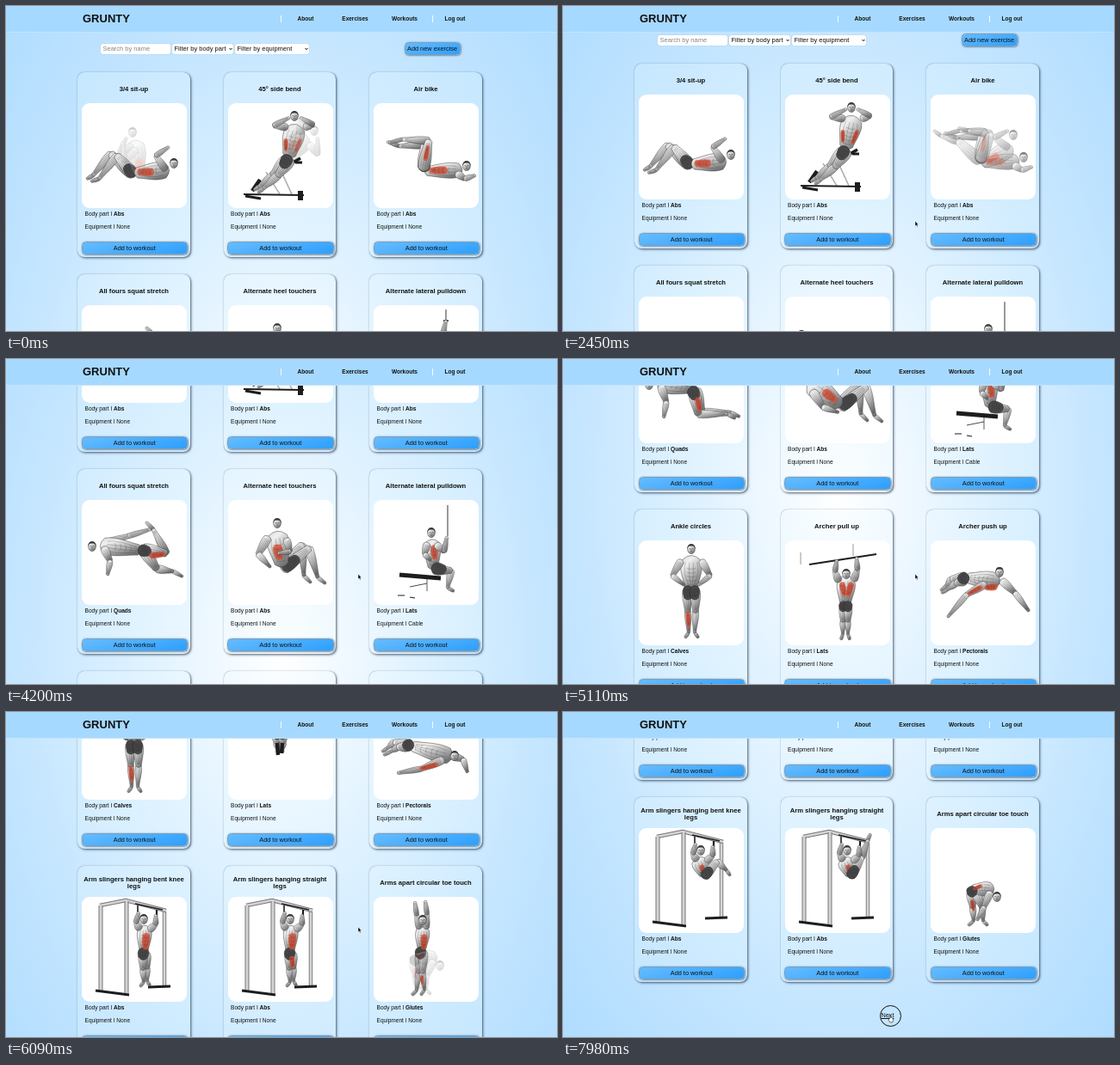
These frames come from a looping animation (640x378 px, 8000 ms). An HTML page:

```html
<!DOCTYPE html>
<html lang="en">
<head>
<meta charset="utf-8">
<title>Exercises</title>
<style>
html, body { margin: 0; width: 100%; height: 100%; overflow: hidden; }
body { position: relative; font: 6.57px "Liberation Sans", Arial, sans-serif; color: #111; background: #b5dfff; }
body *, #page { position: absolute; box-sizing: border-box; white-space: nowrap; }
svg *, b { position: static; }
#page { left: 0; top: 0; width: 640px; height: 1061px; background: radial-gradient(#fff, #dbf0ff 40%, #c3e5ff 70%, #afdcff); }
header { left: 0; top: 0; width: 640px; height: 30.5px; background: #a6d9ff; border-bottom: 1px solid #c2e4fb; }
header h1 { left: 89px; top: 7px; margin: 0; font-size: 13px; line-height: 15px; }
header span { top: 10px; line-height: 9px; font-size: 6.53px; font-weight: bold; transform: translateX(-50%); }
header i { top: 11px; width: 1px; height: 7.5px; background: #f4fbff; }
.field { top: 43.5px; height: 12.5px; padding-left: 2.5px; line-height: 12.5px; font-size: 7.5px; background: #fff; border-radius: 2px; box-shadow: 0 0 .8px #789; }
.field svg { right: 1.5px; top: 4.5px; width: 4px; height: 4px; }
.button { height: 15px; line-height: 13px; font-size: 7.35px; text-align: center; border-radius: 4.5px;
  border: 1px solid #7c9fba; background: linear-gradient(165deg, #66bcff, #2d9fff); box-shadow: .5px .5px 2px rgba(20, 50, 80, .7); }
.card { width: 130.5px; height: 215px; border-radius: 8px; background: rgba(235, 247, 255, .2);
  box-shadow: 0 0 .8px rgba(60, 95, 130, .8), 1.2px 1.2px 2.6px rgba(15, 35, 60, .65); }
.card p { margin: 0; left: 8.5px; line-height: 10px; }
.title { left: 5px; top: 10px; width: 121px; height: 20px; display: flex; align-items: center; justify-content: center;
  white-space: normal; text-align: center; font-weight: bold; font-size: 7.65px; line-height: 8.5px; }
.figure { left: 5px; top: 36px; width: 122px; height: 122px; border-radius: 9px; background: #fff; overflow: hidden; }
#next { left: 369.5px; top: 1031px; line-height: 10px; font-size: 7.3px; }
#ring { left: 367.5px; top: 1023.5px; width: 25px; height: 25px; border: 1.3px solid #111; border-radius: 50%; }
#arrow, #hand { left: 0; top: 0; overflow: visible; }
</style>
</head>
<body>
<svg width="0" height="0"><defs><linearGradient id="skin" x2=".6" y2="1">
  <stop stop-color="#d8d8d8"/><stop offset=".3" stop-color="#f0f0f0"/><stop offset=".6" stop-color="#bcbcbc"/><stop offset="1" stop-color="#747474"/>
</linearGradient></defs></svg>
<div id="page">
  <div class="field" style="left:110px;width:81px;color:#858585">Search by name</div>
  <div class="field" style="left:193px;width:71px">Filter by body part<svg viewBox="0 0 4 4"><path d="M.5 1 2 2.7 3.5 1" fill="none" stroke="#111"/></svg></div>
  <div class="field" style="left:266px;width:86px">Filter by equipment<svg viewBox="0 0 4 4"><path d="M.5 1 2 2.7 3.5 1" fill="none" stroke="#111"/></svg></div>
  <div class="button" style="left:462.5px;top:42px;width:65px">Add new exercise</div>
  <div id="next">Next</div><div id="ring"></div>
</div>
<header>
  <h1>GRUNTY</h1><i style="left:319px"></i>
  <span style="left:348px">About</span><span style="left:405.5px">Exercises</span><span style="left:463px">Workouts</span>
  <i style="left:495px"></i><span style="left:521.5px">Log out</span>
</header>
<svg id="arrow" width="6" height="9"><path d="M0 0V6L1.3 4.9 2.2 7 3.2 6.5 2.3 4.6H4Z" fill="#000" stroke="#fff" stroke-width=".5"/></svg>
<svg id="hand" width="7" height="10"><path d="M1.2 5V.8Q1.8 0 2.4.8V3.4L5.4 4.2V7L4.6 9H1.8L0 6Q.2 4.8 1.2 5Z" fill="#fff" stroke="#111" stroke-width=".6"/></svg>
<script>
const PERIOD = 2000, FADE = 100, LOOP = 8000, STEP = 70;

// A tapered, bulging muscle between two joints, with fibres along it and ribs across it.
function muscle([x1, y1, x2, y2], r1, r2, { fill = 'url(#skin)', ink = '#3c3c3c', edge = ink, ribs = [] } = {}) {
  const dx = x2 - x1, dy = y2 - y1, len = Math.hypot(dx, dy) || 1;
  const at = (k, side) => `${(x1 + dx * k - dy / len * side).toFixed(1)},${(y1 + dy * k + dx / len * side).toFixed(1)}`;
  const outline = `M${at(0, r1)}C${at(.35, r1 * 1.35)} ${at(.65, r2 * 1.25)} ${at(1, r2)}Q${at(1 + r2 / len, 0)} ${at(1, -r2)}` +
    `C${at(.65, -r2 * 1.25)} ${at(.35, -r1 * 1.35)} ${at(0, -r1)}Q${at(-r1 / len, 0)} ${at(0, r1)}Z`;
  const fibres = [-.6, -.2, .2, .6].map(s => `M${at(.08, r1 * s)}Q${at(.45, r1 * s * 1.6)} ${at(.92, r2 * s * .7)}`).join('') +
    ribs.map(k => `M${at(k, -r2 * .7)}Q${at(k + .08, 0)} ${at(k, r2 * .7)}`).join('');
  return `<path d="${outline}" fill="${fill}" stroke="${edge}" stroke-width=".5"/>` +
    `<path d="${fibres}" fill="none" stroke="${ink}" stroke-width=".45" opacity=".6"/>`;
}

const line = (n, color) =>
  `<polyline points="${n.slice(0, -1)}" fill="none" stroke="${color}" stroke-width="${n.at(-1)}" stroke-linejoin="round"/>`;

const parts = {
  A: n => muscle(n, 3.8 * (n[6] || 1), 2.6 * (n[6] || 1)) + muscle(n.slice(2), 2.8 * (n[6] || 1), 1.6),
  L: ([...n]) => {
    const k = n[8] || 1;
    return muscle(n.slice(4), 2 * k, 1.5) + muscle(n.slice(2), 4.3 * k, 2 * k) + muscle(n, 6.2 * k, 4 * k);
  },
  T: n => muscle(n, n[4] || 9, (n[4] || 9) * .68, { ribs: [.3, .45, .6, .75, .9] }),
  S: n => muscle(n, n[4] || 5.8, (n[4] || 5.8) * .88, { fill: '#48484a', ink: '#1c1c1c' }),
  R: n => muscle(n, n[4] || 2.8, (n[4] || 2.8) * .8, { fill: 'rgba(214,78,52,.78)', ink: '#7d2416', edge: 'none', ribs: [.2, .45, .7] }),
  H: ([x, y]) => `<g transform="translate(${x} ${y})"><ellipse rx="4.4" ry="5.6" fill="url(#skin)" stroke="#3c3c3c" stroke-width=".5"/>` +
    '<path d="M-4.5.5Q-5-6 0-6T4.5.5Q4-2.5 2.6-3.2T-2.6-3.2Q-4-2.5-4.5.5Z" fill="#3a3a3a"/>' +
    '<path d="M-2.4-.4H-.8M.8-.4H2.4M0 0V1.6M-1.2 3H1.2" stroke="#444" stroke-width=".6"/></g>',
  K: n => line(n, '#1d1d1f'),
  G: n => line(n, '#77777a') + line([...n.slice(0, -1), n.at(-1) * .6], '#d4d4d6')
};

const draw = pose => pose.split(';').filter(Boolean).map(part =>
  parts[part[0]](part.match(/[\d.]+/g).map(Number))).join('');

// Shared equipment and half figures
const bench = 'G 60,106 44,80 1.3;G 62,80 74,106 1.3;K 18,106 88,107 2;K 84,102 84,113 6;K 28,102 37,89 4.5;K 20,108 38,111 3;K 70,72 84,64 3.5;K 78,69 86,69 3;';
const benchLegs = 'L 68,65 52,84 36,97 30,101;L 72,66 58,84 41,99 35,104;';
const seat = 'G 62,92 62,106 2;K 30,87 78,91 5;K 28,111 36,111 1.2;K 42,113 48,114 1.2;K 42,101 62,97 .8;L 70,81 90,82 86,102 93,106 .85;';
const seated = 'T 68,50 69,78 8.5;S 70,79 82,81;R 70,54 71,68 3.6;A 62,51 59,63 66,70;';
const bar = 'G 18,14 18,28 .8;G 79,4 79,18 .8;K 28,28 106,16 1.8;';
const rack = 'G 96,17 96,104 4.5;G 21,10 51,4 98,16 4.5;G 22,10 22,109 5;G 52,5 52,112 5;K 62,8 94,15 1.6;K 16,109 55,114 3.2;K 77,105 103,104 3;K 65,10 65,20 1.6;K 87,15 87,24 2.2;K 86,23 82,34 1;';
const hanging = 'L 75,66 76,83 76,98 79,103 .72;L 71,66 71,84 72,99 68,104 .75;T 73,37 72,62 7.5;S 72,62 71,71 5.4;R 75,44 74,60 4;';
const hangArms = 'A 67,37 63,30 66,18;A 79,38 86,32 86,21;H 72,26';
const tucked = 'T 70,38 76,54 8.5;R 73,44 76,53;';
const sitLegs = 'L 58,82 34,59 13,84 6,88;L 60,83 41,61 20,88 11,91;S 60,82 52,74;';
const touchLegs = 'L 64,78 86,52 88,88 96,96;L 65,80 94,56 104,90 113,97;S 66,79 80,68;';

// name, body part, equipment, props, first pose, second pose, start and length of the first pose
const exercises = [
  ['3/4 sit-up', 'Abs', 'None', '', sitLegs + 'T 97,78 64,81;R 82,80 66,80 4.2;A 97,77 86,61 101,51;H 107,70',
    sitLegs + 'T 62,48 66,80 10;R 68,66 64,79 4;A 58,50 44,58 52,40;A 63,54 50,68 47,46;H 59,34', 1925],
  ['45° side bend', 'Abs', 'None', bench + benchLegs, 'T 78,30 71,60 11;S 70,63 64,73;R 67,42 67,55 2.2;R 84,42 78,57 2.2;A 68,28 53,26 71,17;A 89,28 99,25 84,17;H 77,15',
    'T 88,42 72,61 10.5;S 70,63 64,73;R 77,44 70,55;A 84,35 84,18 98,25;A 94,48 104,60 104,40;H 100,32', 1925],
  ['Air bike', 'Abs', 'None', '', 'L 58,75 59,48 30,50 16,45;T 99,78 62,79 8;S 58,77 60,68;L 58,76 64,44 34,42 18,46;R 84,78 66,78 4;R 60,66 63,50 2.4;A 97,82 106,88 118,84;H 108,73',
    'L 57,77 32,54 12,48 4,42;T 91,63 62,80 9;S 57,77 64,66;L 58,76 70,46 44,42 32,39;R 78,70 66,78 3.6;A 90,62 74,50 90,42;H 96,47', 1400],
  ['All fours squat stretch', 'Quads', 'None', '', 'A 28,50 54,42 80,34;L 72,58 87,80 106,83 117,89;T 26,53 66,58;L 72,57 98,62 83,34 75,26;S 68,58 78,60;R 80,65 96,63 3.2;A 26,56 33,71 30,87 1.1;H 12,54',
    'L 66,60 73,86 106,86 117,91;T 26,53 64,58;L 64,60 69,88 103,88 112,93;S 62,59 66,69;R 68,70 71,84;A 26,56 32,74 29,92 1.1;H 12,54', 1250],
  ['Alternate heel touchers', 'Abs', 'None', '', touchLegs + 'T 57,42 62,74 11.5;R 57,54 60,68 5;A 46,44 35,63 49,78 1.2;A 68,46 72,60 58,62;H 57,27',
    touchLegs + 'T 32,54 62,76 11.5;R 46,62 58,72 4.5;A 32,62 44,80 62,86 1.2;H 19,45', 1250],
  ['Alternate lateral pulldown', 'Lats', 'Cable', seat, 'K 86,6 86,42 .9;' + seated + 'A 73,52 82,60 85,43;H 67,38',
    'K 84,5 84,18 .9;K 81,18 87,18 1.6;' + seated + 'A 73,50 80,36 84,18;H 67,38', 50, 1700],
  ['Ankle circles', 'Calves', 'None', '', 'L 56,58 57,83 58,107 54,113 .8;L 66,58 66,83 65,107 69,113 .8;T 61,23 61,54 11;S 57,55 57,67 4.8;S 65,55 65,67 4.8;R 57,84 58,100 2.4;A 49,24 39,41 53,52;A 73,24 83,41 69,52;H 61,10', '', 0, PERIOD],
  ['Archer pull up', 'Lats', 'None', bar, 'L 68,78 67,94 67,109 65,115 .7;L 73,78 73,94 73,109 75,115 .7;T 71,46 70,72 9.5;S 68,73 67,81 4.3;S 73,73 73,81 4.3;R 66,50 69,64 3.2;R 77,50 73,64 3.2;A 62,47 58,36 60,23;A 80,46 84,34 83,20;H 71,39',
    'L 57,48 56,56 58,64 57,67 .8;L 63,48 64,56 63,64 63,67 .8;T 57,20 60,44 10;S 57,44 57,50 4.5;S 63,44 63,50 4.5;R 52,23 56,36;R 64,23 62,36;K 57,56 58,70 4.5;K 63,56 62,68 4.5;A 48,22 42,33 48,24;A 66,22 78,22 90,18;H 56,10', 900],
  ['Archer push up', 'Pectorals', 'None', '', 'L 40,43 24,45 18,53 12,58 .85;L 40,46 29,50 20,57 13,61 .85;T 76,47 44,44;S 42,43 34,45;A 63,51 42,63 20,89 1.1;A 83,47 98,61 114,82 1.1;R 59,54 44,62 2.4;R 76,54 64,55 3.6;H 80,37',
    'L 40,58 24,55 16,62 10,66 .85;L 40,60 28,61 20,66 12,70 .85;T 87,71 46,60;S 44,59 36,58;A 80,76 56,86 28,91 1.1;A 91,71 104,75 109,90 1.1;R 74,81 54,86 2.6;H 94,71', 900],
  ['Arm slingers hanging bent knee legs', 'Abs', 'None', rack, hanging + hangArms,
    tucked + 'L 76,56 91,39 102,49 106,55 .85;S 76,56 83,48 5;' + hangArms, 1985],
  ['Arm slingers hanging straight legs', 'Abs', 'None', rack, hanging + 'R 74,70 75,82 2.6;' + hangArms,
    tucked + 'L 76,56 89,34 96,14 99,7 .85;S 76,56 82,46 5;' + hangArms, 1985],
  ['Arms apart circular toe touch', 'Glutes', 'None', '', 'L 54,64 52,88 50,109 45,114 .75;L 58,64 57,88 59,108 55,114 .75;T 57,38 56,60 7.2;S 55,61 54,70 5.4;R 59,45 58,60 3.4;R 56,92 57,102 1.8;A 53,36 50,21 48,6 .9;A 61,36 62,20 60,5 .9;H 57,27',
    'L 47,75 49,92 50,108 44,113 .8;L 53,75 60,92 61,108 66,113 .8;T 70,71 49,71 7.5;S 48,70 48,78 5.2;R 59,67 50,71 2;R 48,84 50,96 1.8;A 69,75 62,92 54,107;H 77,80', 2015]
];

const page = document.getElementById('page');
const figures = exercises.map(([name, area, kit, props, first, second, start, length = PERIOD / 2], i) => {
  const card = document.createElement('div');
  card.className = 'card';
  card.style.cssText = `left:${83 + i % 3 * 169.5}px;top:${77 + Math.floor(i / 3) * 235}px`;
  card.innerHTML = `<div class="title">${name}</div>
    <svg class="figure" viewBox="0 0 122 122">${draw(props)}<g class="pose">${draw(first)}</g><g class="pose">${draw(second)}</g></svg>
    <p style="top:160px">Body part I <b>${area}</b></p><p style="top:175px">Equipment I ${kit}</p>
    <div class="button" style="left:4.5px;top:196.5px;width:123.5px">Add to workout</div>`;
  page.append(card);
  return { poses: card.querySelectorAll('.pose'), start, length };
});

// Piecewise linear track of [time, value] pairs.
function track(points, t) {
  const i = points.findIndex(p => p[0] > t);
  if (i === 0) return points[0][1];
  if (i < 0) return points.at(-1)[1];
  const [t0, v0] = points[i - 1], [t1, v1] = points[i];
  return v0 + (v1 - v0) * (t - t0) / (t1 - t0);
}

const clamp = v => Math.max(0, Math.min(1, v));
const scrollTrack = [[2380, 0], [2450, 10], [3640, 71], [4200, 184], [5110, 372], [6090, 603], [6650, 683]];
const pointerX = [[6900, 409], [7630, 378]], pointerY = [[6900, 250], [7630, 352]];
const [arrow, hand, ring, next] = ['arrow', 'hand', 'ring', 'next'].map(id => document.getElementById(id));
const show = (element, on) => element.style.visibility = on ? 'visible' : 'hidden';

function render(now) {
  const t = Math.floor(now % LOOP / STEP) * STEP;
  page.style.transform = `translateY(${-track(scrollTrack, t)}px)`;
  for (const { poses, start, length } of figures) {
    const phase = (t - start + 2 * PERIOD) % PERIOD;
    const mix = length === PERIOD ? 1 : phase < length ? clamp(phase / FADE) : 1 - clamp((phase - length) / FADE);
    poses[0].style.opacity = clamp(mix * 1.35);
    poses[1].style.opacity = 1 - mix;
  }
  const hover = t >= 7630;
  arrow.style.transform = hand.style.transform = `translate(${track(pointerX, t)}px, ${track(pointerY, t)}px)`;
  show(arrow, t >= 2100 && !hover);
  show(hand, hover);
  show(ring, hover);
  next.style.textDecoration = hover ? 'underline' : 'none';
  requestAnimationFrame(render);
}
requestAnimationFrame(render);
</script>
</body>
</html>
```
